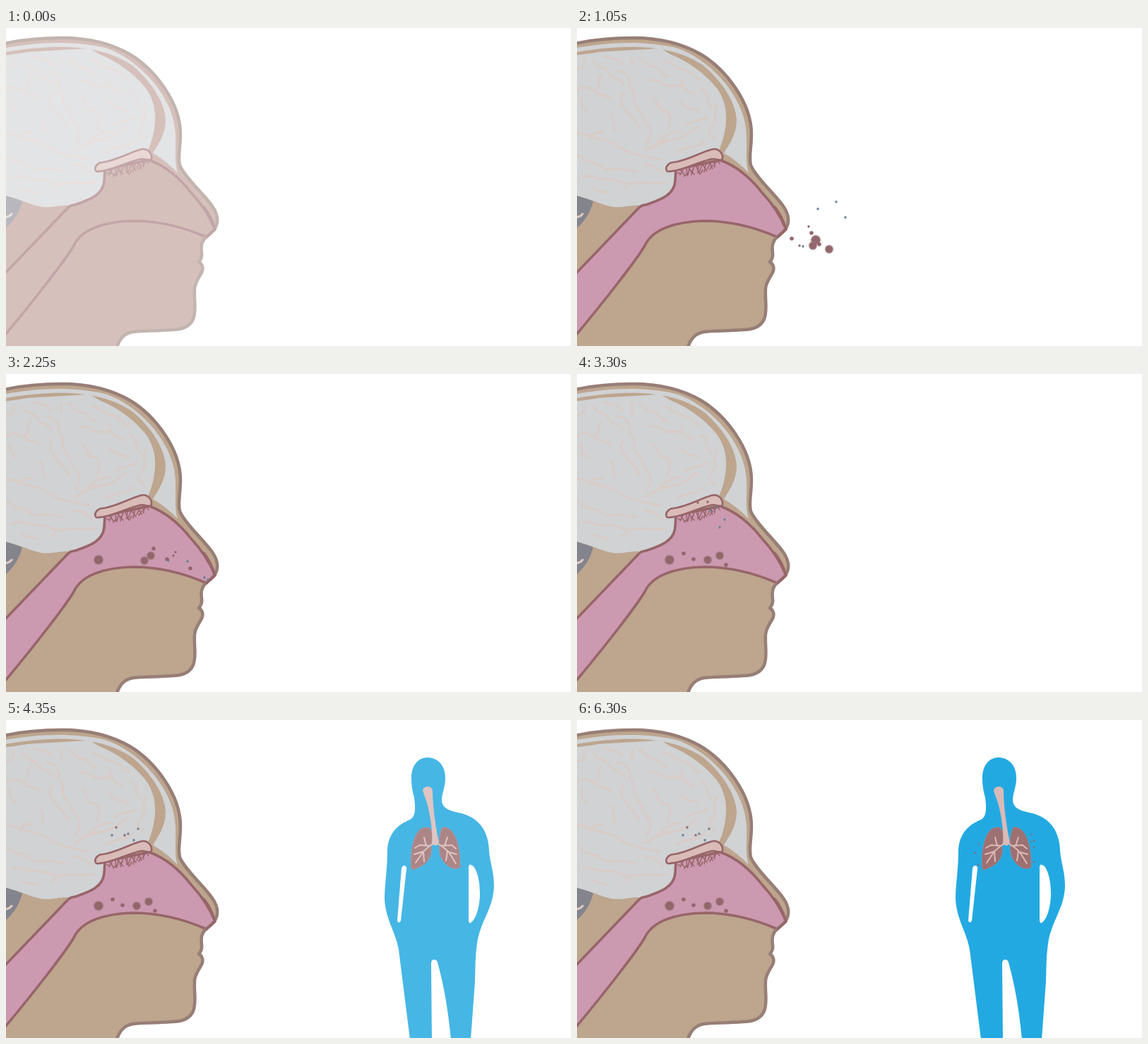
These frames come from a looping animation (800x450 px, 6800 ms). An HTML page without scripts:

```html
<!DOCTYPE html>
<html lang="en">
<head>
<meta charset="utf-8">
<title>Inhaled particles</title>
<style>
html, body { margin: 0; width: 100%; height: 100%; overflow: hidden; background: #fff; }
svg { display: block; width: 100vw; height: 100vh; }
path { stroke-linecap: round; stroke-linejoin: round; }

.head, .body, .cloud, .cloud circle, .shed circle, .skin, .nose { animation: 6.8s infinite; }
.head { animation-name: head-in; animation-timing-function: step-end; }
.body { animation-name: body-in; animation-timing-function: step-end; }
.cloud { animation-name: arrive; }
.cloud circle { animation-name: inhale; }
.shed circle { animation-name: shed; }

.skin, .nose { fill: var(--tone); animation-name: tint; animation-timing-function: step-end; }
.skin { --tone: #bda58e; }
.nose { --tone: #cb9ab1; stroke: #976569; stroke-width: 3.6; }
.outline, .folds, .hairs, .bronchi, .line { fill: none; }
.outline { stroke: #977e76; stroke-width: 4.5; }
.bone { fill: #d0d2d4; }
.folds { stroke: #d9cbc6; stroke-width: 3; }
.bulb { fill: #d9bcb8; stroke: #976569; stroke-width: 2.6; }
.hairs { stroke: #976569; stroke-width: 1.5; }
.lung { fill: #9d7071; stroke: #a58084; }
.airway { fill: #dabab8; }
.bronchi { stroke: #dabab8; stroke-width: 2; }
.dot { fill: #93666b; }
.blue { fill: #697f92; }
.big { stroke: #a1878c; stroke-opacity: .6; stroke-width: 2.4; stroke-dasharray: 1 1; }

@keyframes head-in { 0% { opacity: .58; } 2.2% { opacity: .86; } 4.4%, 100% { opacity: 1; } }
@keyframes tint { 0% { fill: #b9938a; } 2.2%, 100% { fill: var(--tone); } }
@keyframes body-in {
  0%, 57.34% { opacity: 0; }
  59.55% { opacity: .277; }
  61.76% { opacity: .56; }
  63.97% { opacity: .84; }
  66.17%, 100% { opacity: 1; }
}
@keyframes arrive {
  0%, 6.61% { opacity: 0; translate: 28px 0; animation-timing-function: steps(2); }
  11.02% { opacity: 1; translate: 28px 0; animation-timing-function: steps(2); }
  15.43%, 100% { opacity: 1; translate: 0 0; }
}
@keyframes inhale {
  0%, 15.43% { translate: var(--air); animation-timing-function: steps(8); }
  33.08% { translate: var(--nose); animation-timing-function: steps(7); }
  48.52% { translate: var(--rest); animation-timing-function: steps(4); }
  57.34%, 100% { translate: var(--brain, var(--rest)); }
}
@keyframes shed {
  0%, 77.2% { translate: var(--from); opacity: 0; animation-timing-function: steps(7); }
  92.64%, 100% { translate: var(--to); opacity: 1; }
}
</style>
</head>
<body>
<svg viewBox="0 0 800 450">
  <defs>
    <path id="profile" d="M-10,24C20,16 50,14 80,14C110,14 145,20 175,37C210,58 247,105 247,150C247,170 243,182 246,194C252,210 280,235 292,252C299,262 301,270 298,279C296,286 290,290 284,295C276,302 276,310 277,318C278,325 276,328 273,331C278,334 280,340 277,346C273,354 267,360 267,370C266,385 270,400 265,412C260,423 250,427 235,427C210,429 195,428 180,430C167,432 160,440 156,455H-10Z"/>
  </defs>

  <g class="head">
    <use href="#profile" class="skin"/>
    <path class="bone" d="M-5,29C40,20 95,17 140,28C185,42 238,95 240,150C241,178 238,188 243,205C232,193 221,185 208,177C216,164 226,150 226,130C225,105 205,75 180,54C145,29 90,18 -5,35Z"/>
    <path d="M-5,235L23,245C19,261 11,275 -5,287Z" fill="#84848d"/>
    <path class="line" d="M-4,268Q4,268 8,263" stroke="#dcc9c1" stroke-width="3"/>
    <path class="bone" d="M-5,39C10,37 20,36 30,34L115,29C122,29 126,34 132,37C160,48 182,66 197,84C209,99 212,118 211,132C210,148 206,163 200,175L140,198C141,225 135,237 120,243C105,249 100,251 86,251C72,251 64,255 50,253C37,251 25,244 -5,236Z"/>
    <g class="folds">
      <path d="M-4,58C8,60 12,52 10,44M24,46C28,58 40,54 44,62C48,72 62,70 66,80M38,40C50,44 60,42 64,52M78,42V54M58,60C70,62 78,72 74,82C84,92 78,102 84,112"/>
      <path d="M88,42C98,46 96,54 106,54C116,55 118,64 128,68M104,74C118,72 122,84 136,82C150,78 154,90 166,94M122,46C134,48 138,56 148,58C162,60 164,70 174,74M146,72L150,80"/>
      <path d="M-4,92C6,84 12,80 22,88C32,98 42,92 48,102M6,98C4,108 10,114 14,118M34,66C28,76 34,82 26,88M48,122C54,130 50,138 54,146M66,92C58,104 64,110 70,118C78,128 84,132 88,142"/>
      <path d="M-4,148C12,148 20,156 34,158C52,160 62,172 80,178C94,182 104,184 118,186M20,156C22,148 30,146 38,148M84,112C94,118 92,130 100,138C108,146 104,156 98,164M108,98C116,106 112,116 124,118C136,120 132,134 128,144"/>
      <path d="M98,174C112,164 122,160 136,158C152,156 160,146 170,140M112,166C122,154 134,146 146,146M148,104C152,116 164,112 172,118M176,86C188,92 182,106 190,112M198,108C190,118 202,128 192,138C184,146 188,152 196,158M154,138C164,130 176,132 184,126M142,176C156,166 170,172 180,160"/>
      <path d="M-4,178C8,182 10,190 22,190C34,192 38,204 50,200C64,196 72,204 84,202M8,212C20,204 28,216 42,214C58,212 66,224 82,220C96,216 108,222 126,218M66,230C70,222 74,220 82,220M96,194C108,192 114,200 122,206M22,226C28,232 38,230 44,234"/>
    </g>
    <path class="nose" d="M203,187C230,197 248,215 262,233C280,252 289,268 296,285L284,296C250,281 215,273 180,273C140,274 107,284 96,308C85,327 40,385 -6,440V352L88,254C92,250 94,251 98,250C115,244 137,238 139,217L140,200Z"/>
    <use href="#profile" class="outline"/>
    <path class="line" d="M280,253C289,264 293,274 296,285L284,296" stroke="#976569" stroke-width="3.2"/>
    <path class="hairs" d="M146,200l6,8M151,199l-5,9M155,198l1,11M160,196l-3,12M158,198l8,9M166,195l-4,13M168,194l6,13M172,193l-1,12M178,192l-5,12M177,192l7,10M183,190l-3,14M187,189l5,10M190,188l-5,11M194,187l1,10M199,186l-5,9M197,186l5,6M146,206l-3,-1M152,210l4,-5M161,204l4,-4M175,206l3,-5M188,200l4,-6"/>
    <path class="bulb" d="M127,202C124,196 131,190 137,190C155,188 173,177 190,172C200,169 207,177 206,185C204,190 196,183 188,186C172,190 152,200 138,202C132,203 128,204 127,202Z"/>
  </g>

  <g class="body">
    <path fill="#23a9e1" d="M597,53C615,54 623,68 622,85C621,98 617,104 617,114C618,126 630,129 645,132C670,139 683,157 684,185C685,200 691,215 691,235C690,265 675,280 668,310C664,335 665,345 664,370L658,452H630C626,410 620,375 611,343Q610,339 606,339Q602,339 602,345L603,452H572L556,325C552,300 536,280 536,250C537,225 540,210 540,185C541,160 555,148 572,141C580,137 580,125 578,110C575,100 574,92 574,82C574,65 583,53 597,53Z"/>
    <path fill="#fff" d="M560,210Q561,206 564,206Q568,207 567,211L559,284Q556,289 554,284ZM656,205C665,203 671,225 671,245C671,265 665,283 658,287Q655,288 655,283V207Z"/>
    <path class="lung" d="M598,152C604,155 605,165 602,178C604,195 596,206 575,212C571,203 574,158 590,153ZM618,152C630,150 643,165 643,208C635,214 621,207 615,192C612,180 613,160 618,152Z"/>
    <path class="airway" d="M590,100C591,93 603,92 604,100C604,115 607,145 613,173L609,178L603,176C605,160 600,125 593,109Z"/>
    <path class="bronchi" d="M608,174C600,176 596,182 591,186L580,202M599,178L586,177L579,181M595,178L592,166M591,186L578,190M591,186L592,200M608,174C616,176 622,182 627,187L637,203M616,178L631,177L637,182M621,178L625,166M627,187L638,190M625,186L623,199"/>
  </g>

  <g class="cloud">
    <circle class="dot big" r="6.5" style="--air:338px 300px;--nose:131px 263px;--rest:131px 263px"/>
    <circle class="dot big" r="5.5" style="--air:334px 308px;--nose:196px 264px;--rest:185px 263px"/>
    <circle class="dot big" r="5.5" style="--air:357px 313px;--nose:205px 257px;--rest:202px 257px"/>
    <circle class="dot" r="2.8" style="--air:332px 290px;--nose:209px 247px;--rest:151px 254px"/>
    <circle class="dot" r="2.8" style="--air:343px 306px;--nose:228px 262px;--rest:165px 262px"/>
    <circle class="dot" r="2.8" style="--air:304px 298px;--nose:261px 275px;--rest:211px 270px"/>
    <circle class="blue" r="1.7" style="--air:367px 246px;--nose:286px 291px;--rest:190px 193px;--brain:173px 161px"/>
    <circle class="blue" r="1.7" style="--air:341px 256px;--nose:281px 288px;--rest:202px 217px;--brain:181px 170px"/>
    <circle class="blue" r="1.7" style="--air:380px 268px;--nose:257px 265px;--rest:209px 206px;--brain:187px 154px"/>
    <circle class="dot" r="1.7" style="--air:328px 281px;--nose:237px 257px;--rest:171px 182px;--brain:156px 152px"/>
    <circle class="dot" r="1.7" style="--air:315px 308px;--nose:240px 252px;--rest:185px 181px;--brain:168px 163px"/>
    <circle class="blue" r="1.7" style="--air:320px 309px;--nose:230px 264px;--rest:198px 188px;--brain:150px 163px"/>
  </g>

  <g class="shed">
    <circle class="dot" r="1.2" style="--from:628px 167px;--to:644px 162px"/>
    <circle class="blue" r="1.2" style="--from:627px 175px;--to:642px 172px"/>
    <circle class="dot" r="1.2" style="--from:630px 176px;--to:647px 171px"/>
    <circle class="dot" r="1.2" style="--from:630px 182px;--to:647px 180px"/>
    <circle class="dot" r="1.2" style="--from:631px 196px;--to:647px 201px"/>
    <circle class="blue" r="1.2" style="--from:586px 178px;--to:569px 175px"/>
    <circle class="dot" r="1.2" style="--from:585px 186px;--to:564px 188px"/>
    <circle class="dot" r="1.2" style="--from:584px 198px;--to:568px 205px"/>
  </g>
</svg>
</body>
</html>
```
